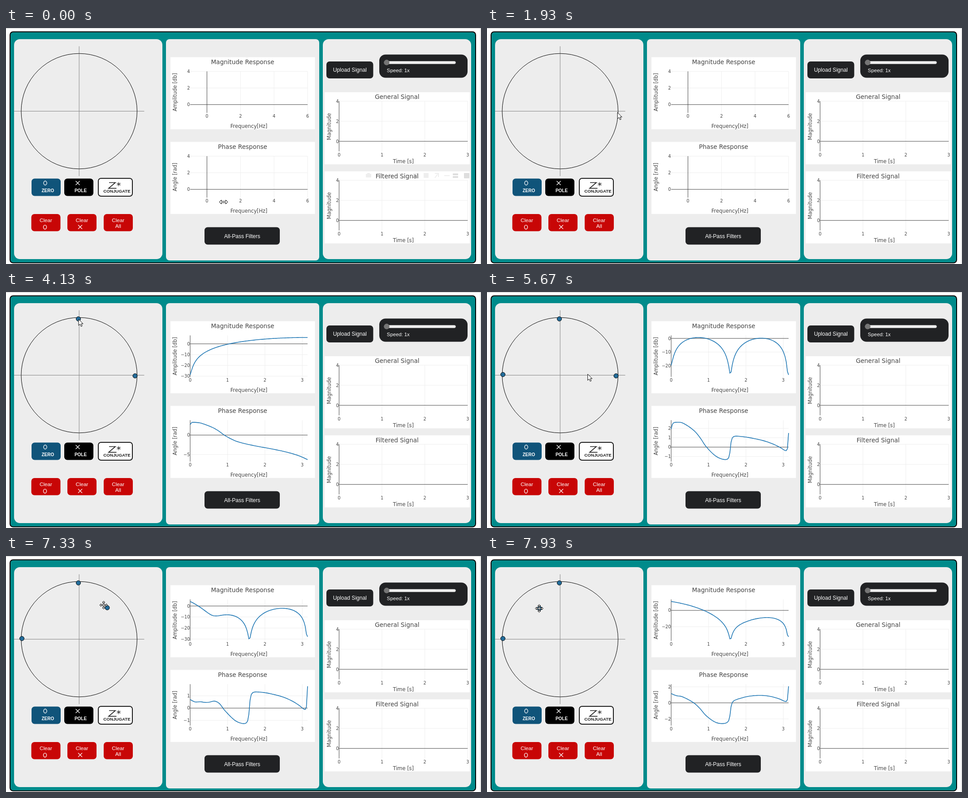
These frames come from a looping animation (1060 px wide and 529 px high, 8 s). An HTML page:

```html
<!DOCTYPE html>
<html lang="en">
<head>
<meta charset="utf-8">
<title>Filter design</title>
<style>
html, body { margin: 0; width: 100%; height: 100%; overflow: hidden; background: #fff; }
svg { display: block; width: 1060px; height: 529px; }
text { font-family: "Liberation Sans", Arial, sans-serif; fill: #fff; text-anchor: middle; font-size: 12.1px; }
.b { font-weight: bold; font-size: 10px; }
.clear { font-size: 11.7px; }
.plot text { font-family: "DejaVu Sans", Verdana, sans-serif; fill: #444; font-size: 9.7px; }
.plot .title { font-size: 13.55px; }
.plot .axis { font-size: 11.45px; }
.plot .y { text-anchor: end; }
.hover { filter: drop-shadow(0 0 2px rgba(0,0,0,.75)) drop-shadow(0 0 1px rgba(0,0,0,.5)); }
</style>
</head>
<body>
<svg id="stage" viewBox="0 0 1060 529"></svg>
<script>
const rect = (x, y, w, h, r, fill, more = '') =>
  `<rect x="${x}" y="${y}" width="${w}" height="${h}" rx="${r}" fill="${fill}" ${more}/>`;
const line = (x1, y1, x2, y2, c, w = 1) =>
  `<path d="M${x1} ${y1}L${x2} ${y2}" stroke="${c}" stroke-width="${w}"/>`;
const text = (x, y, s, cls = '', more = '') => `<text x="${x}" y="${y}" class="${cls}" ${more}>${s}</text>`;
const path = (d, w = 1.2, c = '#fff') => `<path d="${d}" fill="none" stroke="${c}" stroke-width="${w}"/>`;
const ring = (x, y) => `<ellipse cx="${x}" cy="${y}" rx="3.6" ry="4.5" fill="none" stroke="#fff" stroke-width="1.3"/>`;
const cross = (x, y) => path(`M${x - 4.5} ${y - 4.5}l9 9m0-9l-9 9`);

// ---- unit circle and buttons ----
const CX = 163.2, CY = 186.5, R = 129.3;
const DARK = '#212224', RED = '#c80606';
const buttons = [
  [57, 337, 65, 40, rect(57, 337.5, 65, 39, 7, '#10547a') + ring(87.5, 347.5) + text(93.3, 368, 'ZERO', 'b')],
  [130, 337, 65, 40, rect(130, 337.5, 65, 39, 7, '#000') + cross(160, 347.5) + text(166.5, 368, 'POLE', 'b')],
  [205, 336, 78, 42, rect(206, 337, 76, 40, 6, '#fff', 'stroke="#1a1a1a" stroke-width="2"') +
    path('M230 346.5H244L229 359.3H246.5', 1.7, '#222') +
    path('M251.5 345.5v9m-4-6.7l8 4.4m0-4.4l-8 4.4', 1.1, '#222') +
    text(247.5, 369, 'CONJUGATE', 'b', 'style="fill:#222;font-size:9.75px"')],
  [56, 417, 65, 39, rect(56.5, 417, 65, 38.5, 7, RED) + text(89, 435, 'Clear', 'clear') + ring(87, 446.3)],
  [137, 417, 65, 39, rect(137, 417, 65, 38.5, 7, RED) + text(169.5, 435, 'Clear', 'clear') + cross(165.5, 446)],
  [218, 417, 65, 39, rect(218, 417, 65, 38.5, 7, RED) + text(250.3, 435, 'Clear', 'clear') + text(250.3, 448, 'All', 'clear')]
];

// ---- plots ----
const BLUE = '#1f77b4';
function grid(p, xr, yr, dx, dy) {
  const X = v => p.x + (v - xr[0]) / (xr[1] - xr[0]) * p.w;
  const Y = v => p.y + (yr[1] - v) / (yr[1] - yr[0]) * p.h;
  const ticks = (r, d) => {
    const list = [];
    for (let i = Math.ceil(r[0] / d - 1e-6); i * d <= r[1] + 1e-6; i++) list.push(i * d);
    return list;
  };
  const label = v => v < 0 ? '\u2212' + -v : '' + Math.abs(v);
  let under = '', over = '';
  for (const v of ticks(xr, dx)) {
    const s = line(X(v), p.y, X(v), p.y + p.h, v ? '#eee' : '#444');
    if (v) under += s; else over += s;
    if (v >= 0) over += text(X(v), p.y + p.h + 11, label(v));
  }
  for (const v of ticks(yr, dy)) {
    const s = line(p.x, Y(v), p.x + p.w, Y(v), v ? '#eee' : '#444');
    if (v) under += s; else over += s;
    over += text(p.x - .6, Y(v) + 3.5, label(v), 'y');
  }
  return { svg: under + over, X, Y };
}
function frame(x, y, w, h, title, xLabel, yLabel, mid, side) {
  return rect(x, y, w, h, 0, '#fff') + text(mid, y + 15.3, title, 'title') +
    text(mid + 14, y + h - 3, xLabel, 'axis') +
    text(0, 0, yLabel, 'axis', `transform="translate(${x + 13.5} ${side})rotate(-90)"`);
}
const MAG = { x: 411, y: 97.3, w: 262, h: 93 }, PHASE = { x: 411, y: 287.3, w: 262, h: 93 };

// phase of the fixed all-pass stage: smooth curve through a few points
const AP = [[0, 2.38], [.13, 1.9], [.3, 1.45], [.6, .15], [.77, -.9], [.93, -2.1], [1.18, -3.5],
  [1.4, -4.3], [1.76, -5.25], [2.1, -6.02], [2.55, -7.15], [2.9, -8.31], [Math.PI, -9.45]];
function allPass(w) {
  let i = 0;
  while (i < AP.length - 2 && w > AP[i + 1][0]) i++;
  const slope = k => {
    const a = AP[Math.max(k - 1, 0)], b = AP[Math.min(k + 1, AP.length - 1)];
    return (b[1] - a[1]) / (b[0] - a[0]);
  };
  const [x0, y0] = AP[i], [x1, y1] = AP[i + 1], h = x1 - x0, u = (w - x0) / h, v = 1 - u;
  return v * v * (1 + 2 * u) * y0 + u * u * (3 - 2 * u) * y1 + h * u * v * (v * slope(i) - u * slope(i + 1));
}
function response(zeros) {
  const N = 100, ws = [], mag = [], phase = [], last = [];
  for (let i = 0; i <= N; i++) {
    const w = i * Math.PI / N;
    let db = 0, angle = allPass(w);
    zeros.forEach(([zx, zy], k) => {
      const re = Math.cos(w) - (zx - CX) / R, im = Math.sin(w) - (CY - zy) / R;
      let a = Math.atan2(im, re);
      if (i) a += 2 * Math.PI * Math.round((last[k] - a) / (2 * Math.PI));
      last[k] = a;
      db += 20 * Math.log10(Math.hypot(re, im));
      angle += a;
    });
    ws.push(w); mag.push(db); phase.push(angle);
  }
  return { ws, mag, phase };
}
function niceStep(rough) {
  const base = 10 ** Math.floor(Math.log10(rough));
  return base * [1, 2, 5, 10].find(m => m * base >= rough);
}
function curve(p, ws, vs) {
  const lo = Math.min(...vs), hi = Math.max(...vs), pad = (hi - lo) / 18, yr = [lo - pad, hi + pad];
  const g = grid(p, [0, Math.PI], yr, 1, niceStep((yr[1] - yr[0]) / 5));
  const d = ws.map((w, i) => (i ? 'L' : 'M') + g.X(w).toFixed(2) + ' ' + g.Y(vs[i]).toFixed(2)).join('');
  return g.svg + path(d, 1.6, BLUE);
}
function plots(zeros) {
  if (!zeros.length) return [MAG, PHASE].map(p => grid(p, [-1, 6], [-1, 4], 2, 2).svg).join('');
  const { ws, mag, phase } = response(zeros);
  return curve(MAG, ws, mag) + curve(PHASE, ws, phase);
}

// ---- plot toolbar, relative to the plot's top right corner ----
const toolbar = (id, x, y) => `<g id="${id}" transform="translate(${x} ${y})" fill="#444" stroke="#444" stroke-width="0">
  <g opacity=".35">${rect(-237, 6, 12, 8, 1, '#444')}${rect(-234, 4, 6, 3, 1, '#444')}
  <circle cx="-205" cy="9" r="4" fill="none" stroke-width="2"/><path d="M-202 12l4 4" stroke-width="2"/>
  <path d="M-184 4v12m-6-6h12" stroke-width="2"/>
  ${rect(-161, 5, 10, 10, 0, 'none', 'stroke-width="2" stroke-dasharray="2 1"')}
  ${rect(-131, 4, 11, 11, 1, '#444')}${rect(-108, 4, 11, 11, 1, '#444')}
  <path d="M-83 5h8v8m-8 2l6-8M-62 10h12" fill="none" stroke-width="2"/></g>
  <g opacity=".7">${rect(-43, 5, 12, 4, 1, '#444')}${rect(-43, 11, 12, 4, 1, '#444')}${rect(-18, 4, 12, 12, 1, '#444')}</g></g>`;

// ---- static picture ----
const RIGHT = [[144, 'General Signal'], [321.3, 'Filtered Signal']];
stage.innerHTML =
  line(0, .5, 1060, .5, '#c4c4c4') + line(1058.5, 0, 1058.5, 529, '#ccc') +
  rect(9, 8.5, 1039, 518, 7, '#008b8b', 'stroke="#000" stroke-width="2"') +
  rect(18, 25, 331, 493, 13, '#ededed') + rect(357, 25, 342, 496, 8, '#ededed') + rect(707, 25, 331, 493, 13, '#ededed') +
  line(163.2, 41, 163.2, 332, '#848484') + line(18, CY, 308.5, CY, '#848484') +
  `<circle cx="${CX}" cy="${CY}" r="${R}" fill="none" stroke="#000"/>` +
  buttons.map(b => `<g class="button">${b[4]}</g>`).join('') +
  rect(443, 446.5, 168, 39, 7, DARK) + text(527, 470.5, 'All-Pass Filters') +
  rect(715, 75, 104.5, 38, 7, DARK) + text(767.3, 98, 'Upload Signal') +
  rect(833, 59.5, 197, 52, 14, DARK) + text(875.3, 98.5, 'Speed: 1x', '', 'style="font-size:11.3px"') +
  rect(844, 74.5, 159.5, 6, 3, '#efefef', 'stroke="#b2b2b2" stroke-width=".8"') +
  '<circle cx="849.5" cy="77.3" r="6.2" fill="#757575"/>' +
  '<g class="plot">' +
  frame(367, 65.5, 322.5, 161.5, 'Magnitude Response', 'Frequency[Hz]', 'Amplitude [db]', 528, 144) +
  frame(367, 255.3, 322.5, 161.5, 'Phase Response', 'Frequency[Hz]', 'Angle [rad]', 528, 334) +
  RIGHT.map(([y, title]) =>
    frame(711, y, 324, 161.5, title, 'Time [s]', 'Magnitude', 872.8, y + 77) +
    grid({ x: 743.3, y: y + 20, w: 287, h: 112.5 }, [0, 3], [-1, 4], 1, 2).svg).join('') +
  '<g id="curves"></g></g>' + toolbar('barA', 1040, 321) + toolbar('barB', 695, 255) +
  '<g id="dots"></g><path id="cursor" fill="#fff" stroke="#000" stroke-linejoin="round"/>';

// ---- motion ----
const SHAPES = {
  arrow: 'M0 0V14L3.3 11L5.6 16.2L8 15.1L5.8 10.2H10Z',
  hand: 'M-1.5 1Q0-1 1.5 1V7Q3 6 4 7.5Q6 6.5 6.5 8.2Q8.5 7.7 8.5 9.5V13Q8.5 16 7 18.5H-1Q-2.5 15.5-5 12Q-5.5 10-3.5 10L-1.5 12Z',
  resize: 'M-9.5 0L-5-4.5V-1.5H5V-4.5L9.5 0L5 4.5V1.5H-5V4.5Z',
  move: 'M0-9L3-6H1V-1H6V-3L9 0L6 3V1H1V6H3L0 9L-3 6H-1V1H-6V3L-9 0L-6-3V-1H-1V-6H-3Z'
};
const KEYS = [ // time, x, y of the pointer
  [0, 485.5, 390], [67, 485.5, 390], [400, 250, 373], [867, 106, 354], [1200, 107.5, 353], [1500, 235, 235],
  [1733, 294, 191], [1800, 293, 190], [2133, 288.5, 188.5], [2800, 288.5, 188.5], [2867, 256, 140],
  [3200, 190, 82], [3533, 163, 63], [3733, 162, 61], [4400, 162, 61], [4733, 70, 130], [5000, 35.5, 184.5],
  [5467, 35.5, 184.5], [5667, 225, 184], [5900, 274, 186], [6200, 289, 185], [6600, 287, 186], [6934, 288, 187],
  [7000, 284, 180], [7150, 247, 128], [7280, 226, 116], [7333, 218, 110], [7550, 180, 112], [7750, 146, 116],
  [7800, 128, 116], [7870, 117, 117.5], [8000, 116, 117.5]];
function pointer(t) {
  const i = Math.max(1, KEYS.findIndex(k => k[0] >= t)), a = KEYS[i - 1], b = KEYS[i];
  const u = (t - a[0]) / (b[0] - a[0]);
  return [a[1] + (b[1] - a[1]) * u, a[2] + (b[2] - a[2]) * u];
}
const HOME = [288, 188], DRAG = 6990;
const zerosAt = (t, lag, wait) => {
  const list = [], first = t - lag > 6934 ? pointer(t - lag) : HOME;
  if (t >= 2395 + wait) list.push(first);
  if (t >= 4128 + wait) list.push([161.5, 60.3]);
  if (t >= 5395 + wait) list.push([35.5, 185]);
  return list;
};
const fade = v => Math.max(0, Math.min(1, v));
const shapes = document.querySelectorAll('.button');
let shown;

function draw(t) {
  const [x, y] = pointer(t);
  const over = buttons.findIndex(([bx, by, w, h]) => x > bx && x < bx + w && y > by && y < by + h);
  shapes.forEach((b, i) => b.setAttribute('class', i === over ? 'button hover' : 'button'));
  const kind = t >= DRAG ? 'move' : over >= 0 ? 'hand' : x > 411 ? 'resize' : 'arrow';
  cursor.setAttribute('d', SHAPES[kind]);
  cursor.setAttribute('transform', `translate(${x} ${y})`);
  barA.setAttribute('opacity', fade(.25 - t / 300));
  barB.setAttribute('opacity', t < 235 ? t / 300 : fade(.78 - (t - 235) / 300));
  dots.innerHTML = zerosAt(t, 53, 0).map(([cx, cy]) =>
    `<circle cx="${cx}" cy="${cy}" r="5" fill="#236d9b" stroke="#000"/>`).join('');
  curves.innerHTML = plots(zerosAt(t, 183, 65));
}
function tick() {
  const step = Math.floor(((performance.now() % 8000) + 5) / (200 / 3)) % 120;
  if (step !== shown) draw((shown = step) * 200 / 3);
  requestAnimationFrame(tick);
}
tick();
</script>
</body>
</html>
```
